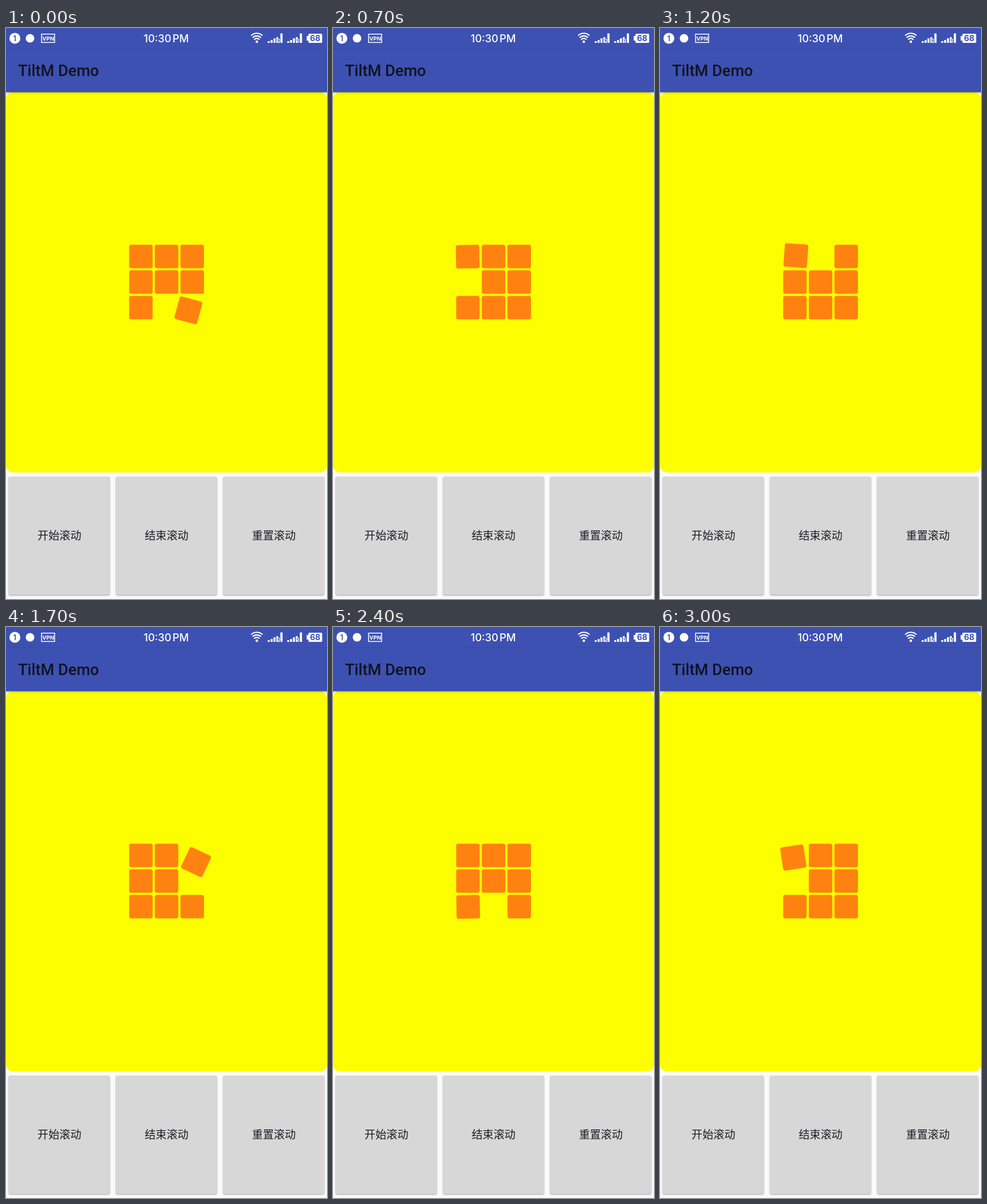
These frames come from a looping animation (561x998 px, 3.1 s). An HTML page:

```html
<!DOCTYPE html>
<html lang="zh-CN">
<head>
<meta charset="utf-8">
<title>TiltM Demo</title>
<style>
  html, body { margin: 0; width: 100%; height: 100%; overflow: hidden; background: #fafafa; }
  svg { display: block; width: 561px; height: 998px; }
  text { font-family: Inter, sans-serif; }
  .title { font: 500 27.2px Roboto, sans-serif; fill: #10131f; }
  .label { font: 400 19.1px "Noto Sans CJK SC", "Noto Sans CJK", sans-serif; fill: #1d1d22; text-anchor: middle; }
  .mid { text-anchor: middle; }
</style>
</head>
<body>
<svg viewBox="0 0 561 998">
  <defs>
    <linearGradient id="shade" x2="0" y2="1">
      <stop offset="0" stop-color="#000" stop-opacity=".22"/>
      <stop offset=".4" stop-color="#000" stop-opacity=".08"/>
      <stop offset="1" stop-color="#000" stop-opacity="0"/>
    </linearGradient>
    <filter id="drop" x="-5%" y="-5%" width="110%" height="110%" color-interpolation-filters="sRGB">
      <feDropShadow dx="0" dy="1.5" stdDeviation="1.3" flood-opacity=".3"/>
    </filter>
  </defs>

  <rect width="561" height="998" fill="#fafafa"/>
  <rect y="112" width="561" height="664.8" rx="12" fill="#fdff00"/>
  <rect y="112" width="561" height="5" fill="url(#shade)"/>
  <rect width="561" height="112.3" fill="#3d51b2"/>
  <rect y="35.5" width="561" height="1" fill="#384aa4"/>
  <text class="title" x="21" y="84">TiltM Demo</text>

  <g fill="#fff">
    <circle cx="15.5" cy="18" r="9.5"/>
    <circle cx="42" cy="18" r="7.5"/>
    <rect x="62.2" y="10.7" width="22.8" height="14.6" fill="none" stroke="#fff" stroke-width="1.5"/>
    <text class="mid" x="73.7" y="21.6" font-size="9.5" font-weight="700">VPN</text>
    <text x="240.5" y="25" font-size="18.4" font-weight="500">10:30</text>
    <text x="291" y="25" font-size="18.4" font-weight="500">PM</text>
    <circle cx="438.3" cy="24" r="2.2"/>
    <g fill="none" stroke="#fff" stroke-width="2.2">
      <path d="M433.6 20.2a6.2 6.2 0 0 1 9.4 0"/>
      <path d="M431 16.7a10.6 10.6 0 0 1 14.6 0"/>
      <path d="M428.3 13.2a14.6 14.6 0 0 1 20 0"/>
    </g>
    <g id="signals"></g>
    <path d="M525.5 14h3v-2.5q0-1.5 1.5-1.5h21q1.5 0 1.5 1.5v13q0 1.5-1.5 1.5h-21q-1.5 0-1.5-1.5v-2.5h-3z"/>
  </g>
  <g fill="#3d51b2">
    <text class="mid" x="15.2" y="22.8" font-size="13" font-weight="600">1</text>
    <text id="charge" class="mid" x="540.4" y="23.2" font-size="14" font-weight="700">68</text>
  </g>

  <g id="buttons"></g>
  <g id="tiles" fill="#ff8210"></g>
</svg>
<script>
const SIZE = 41, PITCH = 44.8, LEFT = 215.3, TOP = 378.7;
const LOOP = 3100, TICK = 100;

// Cells around the border, clockwise from the top left.
const RING = [[0, 0], [1, 0], [2, 0], [2, 1], [2, 2], [1, 2], [0, 2], [0, 1]];

// Time in ms and number of rolls done.
const PACE = [[0, 5.732], [700, 8.07], [1200, 9.865], [1700, 11.646],
  [2100, 13.02], [2700, 15.117], [3000, 16.2], [3100, 16.55]];

const byId = id => document.getElementById(id);

function add(parent, tag, attrs, text) {
  const el = document.createElementNS('http://www.w3.org/2000/svg', tag);
  for (const key in attrs) el.setAttribute(key, attrs[key]);
  if (text) el.textContent = text;
  parent.append(el);
  return el;
}

function addTile([col, row]) {
  return add(byId('tiles'), 'rect', {
    x: LEFT + col * PITCH, y: TOP + row * PITCH, width: SIZE, height: SIZE, rx: 3.5
  });
}

['开始滚动', '结束滚动', '重置滚动'].forEach((label, i) => {
  const x = 4.5 + i * 187.4;
  add(byId('buttons'), 'rect', {
    x, y: 784, width: 177, height: 206.5, rx: 3, fill: '#d7d7d7', filter: 'url(#drop)'
  });
  add(byId('buttons'), 'text', { class: 'label', x: x + 88.8, y: 894 }, label);
});

[[457.5, '2'], [491.5, '1']].forEach(([x, sim]) => {
  [3, 5, 8, 10].forEach((h, i) =>
    add(byId('signals'), 'rect', { x: x + i * 5, y: 26 - h, width: 3.4, height: h }));
  add(byId('signals'), 'rect', { x: x + 22, y: 9.5, width: 3.8, height: 16.5 });
  add(byId('signals'), 'text', {
    x: x + 17, y: 26, 'font-size': 9, 'font-weight': 700,
    stroke: '#3d51b2', 'stroke-width': 1.4, 'paint-order': 'stroke'
  }, sim);
});

addTile([1, 1]);
const tiles = RING.map(addTile);

function rollsAt(t) {
  const i = PACE.findIndex(p => p[0] > t);
  const [t0, a] = PACE[i - 1], [t1, b] = PACE[i];
  return a + (b - a) * (t - t0) / (t1 - t0);
}

// The tile tips back over its inner corner into the free cell.
function roll(from, to, turn) {
  const [x, y] = RING[to];
  const dx = RING[from][0] - x, dy = RING[from][1] - y;
  const half = SIZE / 2, slide = (PITCH - SIZE) * turn;
  const px = LEFT + x * PITCH + half + half * (dx - dy);
  const py = TOP + y * PITCH + half + half * (dy + dx);
  tiles[to].setAttribute('transform',
    `translate(${slide * dx} ${slide * dy}) rotate(${90 * turn} ${px} ${py})`);
}

function draw(t) {
  const rolls = rollsAt(t), step = Math.floor(rolls);
  const from = step % 8, to = (step + 7) % 8;
  tiles.forEach((tile, i) => {
    tile.removeAttribute('transform');
    tile.style.display = i === from ? 'none' : '';
  });
  roll(from, to, (1 + Math.cos(Math.PI * (rolls - step))) / 2);
  byId('charge').style.display = t >= 2000 && t < 2300 ? 'none' : '';
}

const start = performance.now();
function frame() {
  const t = (performance.now() - start) % LOOP;
  draw(Math.floor(t / TICK) * TICK);
  requestAnimationFrame(frame);
}
frame();
</script>
</body>
</html>
```
